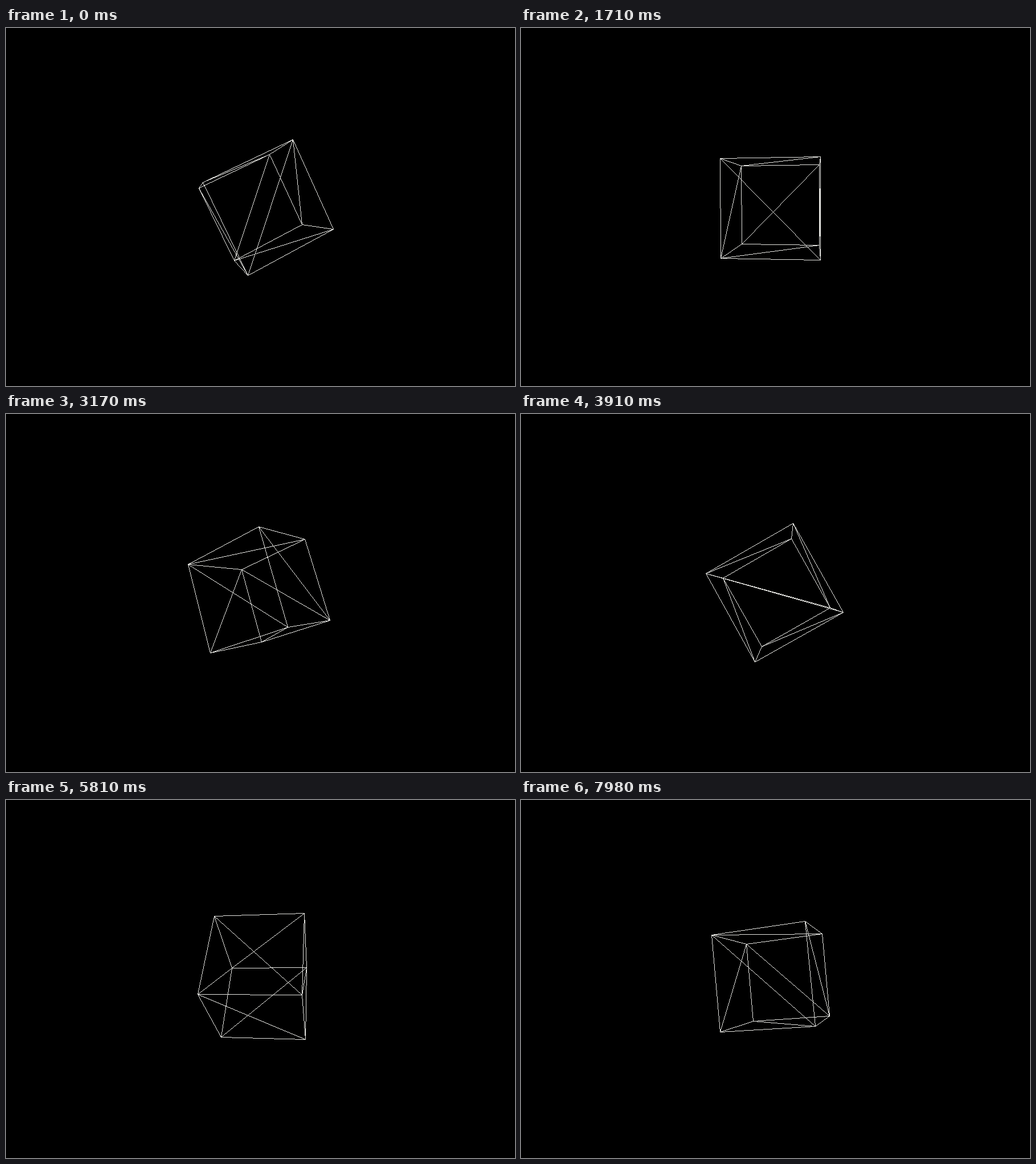
An HTML page with a canvas that plays this animation: 893 px wide and 627 px high, repeating every 8000 ms.

```html
<!DOCTYPE html>
<html lang="en">
<head>
<meta charset="utf-8">
<title>Wireframe cube</title>
<style>
  html, body { margin: 0; width: 100%; height: 100%; overflow: hidden; background: #000; }
  canvas { display: block; width: 100%; height: 100%; }
</style>
</head>
<body>
<canvas id="stage" width="893" height="627"></canvas>
<script>
const LOOP = 8000;
const DEPTH = 8;
const ctx = document.getElementById('stage').getContext('2d');
const arrow = new Path2D('M0 0V14L3 11L6 17L8 16L5.5 10.5L9 10Z');

// Vertex index bits: 1 = x, 2 = y, 4 = z. Every face is split by one diagonal.
const lines = [[0, 3], [1, 7], [5, 6], [4, 2], [2, 7], [5, 0]];
for (let i = 0; i < 8; i++) {
  for (const bit of [1, 2, 4]) if (!(i & bit)) lines.push([i, i | bit]);
}

// Straight sweeps of the pointer across the stage, times in ms
const sweeps = [
  { start: 765, end: 1085, from: [814, 273], to: [329, 17] },
  { start: 2080, end: 2250, from: [600, 19], to: [816, 80] },
  { start: 2680, end: 2950, from: [816, 80], to: [640, 13] },
  { start: 7150, end: 7600, from: [872, 150], to: [690, 12] }
];

// Steady spin in radians, slower at both ends of the loop
function spinAt(s) {
  const lag = Math.max(0, 0.53 - s) ** 2 - Math.max(0, s - 6.9) ** 2;
  return (63.1 + 14.42 * s + 3.2 * lag) * Math.PI / 180;
}

// Spin about the cube's own axis, then turn about the vertical three times as fast
function project(i, spin) {
  const turn = 3 * spin;
  const [x, y, z] = [1, 2, 4].map(bit => i & bit ? 1 : -1);
  const side = x * Math.cos(spin) - z * Math.sin(spin);
  const up = x * Math.sin(spin) + z * Math.cos(spin);
  const px = side * Math.cos(turn) + y * Math.sin(turn);
  const pz = side * Math.sin(turn) - y * Math.cos(turn) + DEPTH;
  return [Math.floor(446.4 + 619 * px / pz), Math.floor(313.3 - 625 * up / pz)];
}

// One pixel per step, without smoothing
function drawLine([x0, y0], [x1, y1]) {
  const steps = Math.max(Math.abs(x1 - x0), Math.abs(y1 - y0), 1);
  for (let i = 0; i <= steps; i++) {
    const k = i / steps;
    ctx.fillRect(Math.round(x0 + (x1 - x0) * k), Math.round(y0 + (y1 - y0) * k), 1, 1);
  }
}

function drawPointer(t) {
  const sweep = sweeps.find(s => t >= s.start && t <= s.end);
  if (!sweep) return;
  const k = (t - sweep.start) / (sweep.end - sweep.start);
  const [x, y] = sweep.from.map((v, n) => Math.round(v + (sweep.to[n] - v) * k));
  ctx.save();
  ctx.translate(x, y);
  ctx.fillStyle = '#fff';
  ctx.fill(arrow);
  ctx.restore();
}

function draw(t) {
  ctx.fillStyle = '#000';
  ctx.fillRect(0, 0, 893, 627);
  const spin = spinAt(t / 1000);
  const points = Array.from({ length: 8 }, (_, i) => project(i, spin));
  ctx.fillStyle = '#e4e4e0';
  for (const [a, b] of lines) drawLine(points[a], points[b]);
  drawPointer(t);
}

const start = performance.now();
function tick() {
  draw((performance.now() - start) % LOOP);
  requestAnimationFrame(tick);
}
tick();
</script>
</body>
</html>
```
